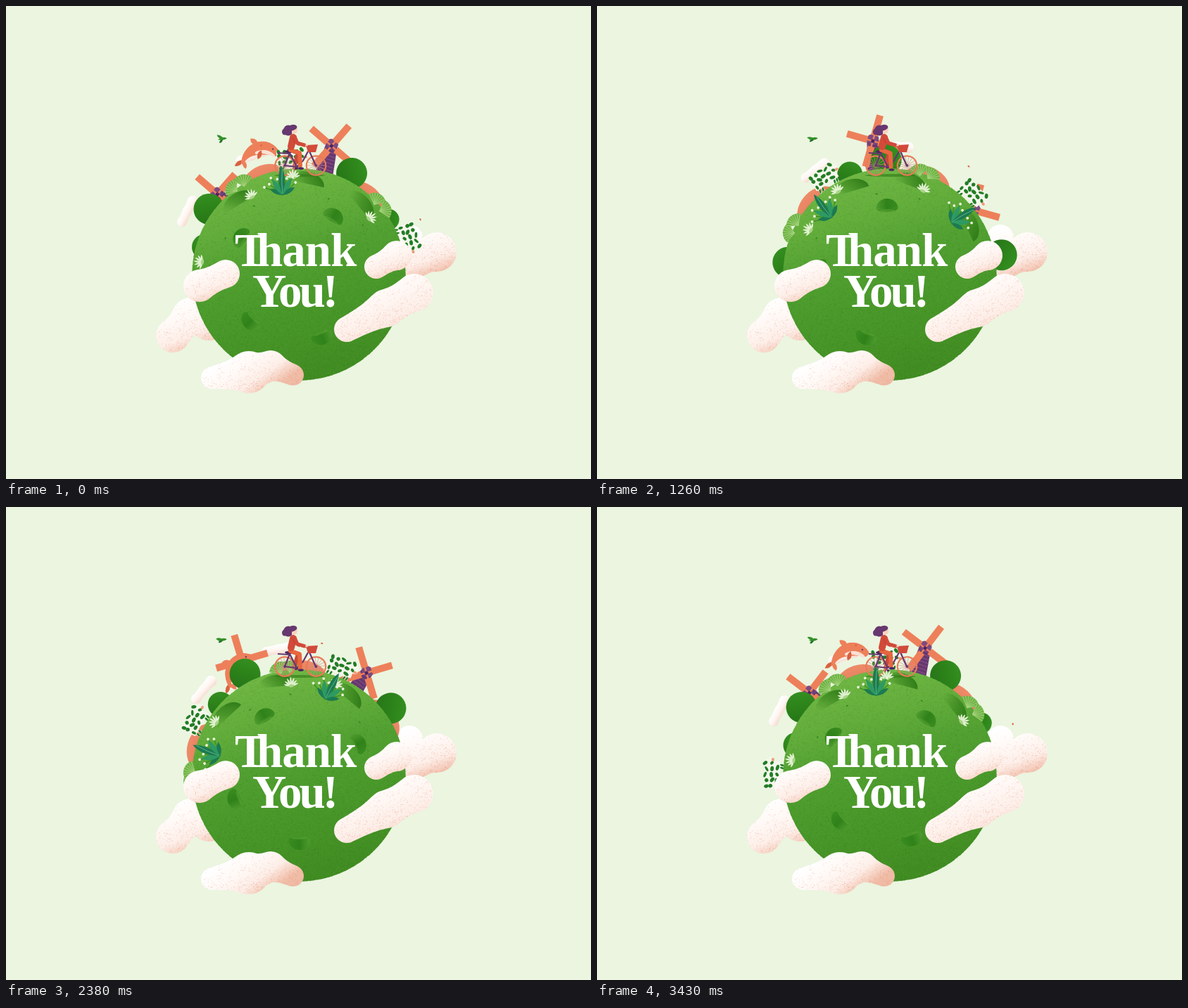
An HTML page with a canvas that plays this animation: 831 by 673 pixels, repeating every 3.5 s.

```html
<!DOCTYPE html>
<html lang="en">
<head>
<meta charset="utf-8">
<title>Thank You!</title>
<style>
html, body { margin: 0; width: 100%; height: 100%; overflow: hidden; background: #ebf5e0; }
canvas { display: block; }
</style>
</head>
<body>
<canvas id="stage" width="831" height="673"></canvas>
<script>
const W = 831, H = 673, LOOP = 3500, STEP = 70, TAU = Math.PI * 2;
const CX = 415, CY = 381;
const ORANGE = '#ed805a', PURPLE = '#67376f', PLUM = '#4d2460', RED = '#d24a3a', SKIN = '#f8d2bd';
const stage = document.getElementById('stage').getContext('2d');
let c = stage;

let seed = 7;
const rand = () => (seed = (seed * 16807) % 2147483647) / 2147483647;
const rad = d => d * Math.PI / 180;
const mix = (a, b, s) => a + (b - a) * s;

// Runs a drawing function once on its own sheet.
function sheet(draw) {
  const el = document.createElement('canvas');
  el.width = W;
  el.height = H;
  c = el.getContext('2d');
  draw();
  c = stage;
  return el;
}
function at(x, y, deg, draw) {
  c.save();
  c.translate(x, y);
  c.rotate(rad(deg));
  draw();
  c.restore();
}
function fade(x0, y0, x1, y1, ...stops) {
  const g = c.createLinearGradient(x0, y0, x1, y1);
  stops.forEach((s, i) => g.addColorStop(i / (stops.length - 1), s));
  return g;
}
function oval(x, y, rx, ry, fill, deg = 0, from = 0, to = 360) {
  c.fillStyle = fill;
  c.beginPath();
  c.ellipse(x, y, rx, ry, rad(deg), rad(from), rad(to));
  c.fill();
}
function trace(p) {
  c.beginPath();
  for (let i = 0; i < p.length; i += 2) c.lineTo(p[i], p[i + 1]);
}
function poly(fill, ...p) {
  c.fillStyle = fill;
  trace(p);
  c.fill();
}
function line(color, width, ...p) {
  c.strokeStyle = color;
  c.lineWidth = width;
  c.lineCap = c.lineJoin = width > 3 ? 'round' : 'butt';
  trace(p);
  c.stroke();
}
function leaf(x, y, deg, len, w, fill) {
  at(x, y, deg, () => {
    c.fillStyle = fill;
    c.beginPath();
    c.moveTo(0, 0);
    c.quadraticCurveTo(-w * 1.6, -len * .6, 0, -len);
    c.quadraticCurveTo(w * 1.4, -len * .5, 0, 0);
    c.fill();
  });
}

// Outline of circles (x, y, r) joined by soft necks.
function blob(p) {
  c.beginPath();
  for (let i = 0; i + 3 < p.length; i += 3) {
    for (let s = 0; s <= 1; s += 1 / 32) {
      const [x, y, r] = [0, 1, 2].map(j => mix(p[i + j], p[i + j + 3], s));
      const neck = r * (1 - .1 * Math.sin(Math.PI * s));
      c.moveTo(x + neck, y);
      c.arc(x, y, neck, 0, TAU);
    }
  }
}
function cloud(tint, ...p) {
  const edge = (j, sign) => Math.max(...p.filter((_, i) => i % 3 === j).map((v, i) => sign * v + p[i * 3 + 2])) * sign;
  const x0 = edge(0, -1), x1 = edge(0, 1), y0 = edge(1, -1), y1 = edge(1, 1);
  const w = x1 - x0, h = y1 - y0;
  c.save();
  blob(p);
  c.fillStyle = fade(x0 + w * .35, y0, x0 + w * .65, y1, '#fff', '#fff9f6', '#fdeee8', tint);
  c.fill();
  c.clip();
  c.fillStyle = 'rgba(228,145,115,.34)';
  for (let i = w * h * .25; i > 0; i--) {
    const u = rand(), v = rand();
    if (rand() < (u * .35 + v * .65) ** 2) c.fillRect(x0 + u * w, y0 + v * h, 1, 1);
  }
  c.restore();
}

const backClouds = sheet(() => {
  cloud('#f2bfa9', 237, 469, 24, 262, 441, 26, 288, 452, 24);
  cloud('#efb49d', 573, 330, 19, 582, 367, 20, 612, 350, 28);
});
const frontClouds = sheet(() => {
  cloud('#f4cbb9', 275, 398, 23, 312, 381, 20);
  cloud('#f0bca6', 293, 529, 16, 345, 521, 30, 376, 512, 22, 408, 525, 15);
  cloud('#f4cbb9', 526, 371, 17, 555, 355, 21);
  cloud('#f6d5c6', 484, 460, 18, 540, 430, 27, 580, 408, 27);
});
const globe = sheet(() => {
  c.beginPath();
  for (let a = 0; a < TAU; a += .006) {
    const r = 150.5 + .5 * rand();
    c.lineTo(416 + r * 1.006 * Math.cos(a), 382 + r * Math.sin(a));
  }
  c.fillStyle = fade(375, 235, 455, 530, '#70b745', '#64ae3c', '#52a032', '#4a992b', '#459226', '#408b22');
  c.fill();
  c.clip();
  for (let i = 0; i < 15000; i++) {
    c.fillStyle = rand() < .5 ? 'rgba(35,105,15,.17)' : 'rgba(140,200,95,.15)';
    c.fillRect(264 + rand() * 305, 232 + rand() * 300, 1, 1);
  }
});

function label() {
  c.fillStyle = '#fff';
  c.font = 'bold 67px "Liberation Serif", "Noto Serif", serif';
  c.letterSpacing = '-1px';
  c.fillText('T', 325, 370);
  c.fillText('hank', 356, 370);
  c.letterSpacing = '-4px';
  c.fillText('You!', 350, 428);
}

const bush = r => () => oval(0, 0, r, r, fade(-r, r, r, -r, '#23701a', '#2c8219', '#379423'));
const hill = () => oval(0, 24, 35, 26, fade(0, -2, 0, 30, '#ee8b68', '#e07a5c'));

function mill(t, lean) {
  poly(PURPLE, -8, -4, 8, -4, 13, 46, -13, 46);
  for (let y = 4; y < 44; y += 5) line('#8d5a90', .8, -9, y, 10, y + 1);
  oval(0, -3, 9, 7, '#7d4a80');
  for (let i = 0; i < 4; i++) {
    at(0, 0, 41 + 180 * t + i * 90 - lean, () => {
      line(ORANGE, 2.5, 0, 0, 10, 0);
      c.fillStyle = ORANGE;
      c.fillRect(8, -5, 30, 10);
    });
  }
  oval(0, 0, 2.5, 2.5, PLUM);
}

function puff() {
  blob([-17, 1, 7, 0, 0, 7, 16, 0, 8]);
  c.fillStyle = fade(0, -7, 0, 8, '#fff', '#fff6f2', '#f6d9cc');
  c.fill();
}

// The fish is bent along an arc and leaps once per loop.
function fish(t) {
  const s = ((t + .42) % 1) / .75;
  if (s > .98) return;
  const bend = 30, y = 202 + 93 * (s - .62) ** 2;
  at(314 + 82 * s, y, -58 + 88 * s, () => {
    c.translate(0, bend);
    const along = (a, draw) => at(0, 0, a, () => { c.translate(0, -bend); draw(); });
    along(-60, () => {
      leaf(2, 0, -55, 15, 4, '#d8613f');
      leaf(2, 0, -125, 13, 4, ORANGE);
    });
    along(-8, () => leaf(4, -5, -35, 14, 5, ORANGE));
    for (let a = -62; a <= 50; a += 2) {
      const r = 2 + 7.5 * Math.sin(Math.PI * ((a + 62) / 124) ** 1.2);
      along(a, () => oval(0, 0, 3, r, ORANGE));
    }
    for (let a = -12; a <= 48; a += 2) {
      along(a, () => oval(0, 5.5, 2, 2.6 * Math.cos(rad(a * 1.4 - 25)), '#fae0d3'));
    }
    along(5, () => leaf(0, 3, 205, 14, 4, '#d8613f'));
    along(36, () => oval(0, -2, 1.2, 1.2, PURPLE));
  });
}

const spots = Array.from({ length: 14 }, (_, i) => ({
  x: -16 + (i % 5) * 8 + rand() * 3, y: -11 + Math.floor(i / 5) * 8 + rand() * 3,
  rx: 2.6 + rand() * 1.6, ry: 1.6 + rand() * 1.2, deg: rand() * 180
}));
function cow() {
  const hide = '#f4f7eb';
  c.fillStyle = hide;
  c.fillRect(-19, -11, 38, 22);
  oval(20, -3, 5, 7, hide, -20);
  for (const x of [-15, -10, 10, 14]) {
    line(hide, 3.5, x, 8, x, 18);
    oval(x, 14, 1.4, 3, '#237d26', 15);
  }
  spots.forEach(s => oval(s.x, s.y, s.rx, s.ry, '#237d26', s.deg));
  oval(22, 1, 2.6, 2, '#ef9b7c');
}

function mound() {
  oval(0, 5, 26, 17, fade(-18, 10, 16, -10, 'rgba(68,145,38,0)', 'rgba(58,134,30,.6)', 'rgba(48,124,24,.95)'), 8, 180, 360);
}
function crater() {
  const fill = fade(-14, 0, 14, 0, '#4c992d', '#2f8119', '#388b1f');
  oval(0, 4, 15.5, 14, fill, 0, 180, 360);
  oval(0, 4, 15.5, 5, fill, 0, 0, 180);
  oval(0, 7, 11, 2, 'rgba(96,170,58,.5)');
}
function tuft() {
  for (let i = -3; i <= 3; i++) leaf(0, 5, i * 25, 13 - Math.abs(i) * .7, 1.8, '#e4f3d4');
  oval(0, 5, 4, 2, '#a9d488');
}
function fan() {
  for (const side of [-1, 1]) {
    at(side * 6, 9, side * 23, () => {
      c.fillStyle = '#6db344';
      c.beginPath();
      c.moveTo(0, 0);
      c.arc(0, 0, 17, rad(-145), rad(-35));
      c.fill();
      for (let k = -50; k <= 50; k += 14) at(0, 0, k, () => line('#a5d27c', .9, 0, 0, 0, -17));
    });
  }
}
function plant() {
  for (let a = -56; a <= 56; a += 16) {
    at(0, 0, a, () => {
      const len = 27 + 3 * Math.sin(a);
      line('#39901f', 1.3, 0, 0, 0, -len);
      oval(0, -len, 1.9, 1.9, '#eaf6dc');
    });
  }
  for (let i = -2; i <= 2; i++) {
    leaf(0, 0, 8 + i * 30, 42 / (1 + Math.abs(i) * .55), 6 - Math.abs(i), i % 2 ? '#2e9a62' : '#1c7a52');
  }
  line('#6bc091', .8, 0, -2, 2, -18, 6, -36);
}
const speck = color => () => oval(0, 0, 1.6, 1.1, color);

// Angle from the top, in degrees, after u turns of the loop.
const turn = (a, b, q = 0) => u => a - b * u - q * u * u;
const sink = r => d => r + Math.min(0, (d + 40) * .4);
const rise = d => Math.max(150, 191 - d * d * .0145);

// Draws every copy of a part that rides around the globe.
function ring(t, angle, dist, draw, lo, hi) {
  for (let u = t - 1; u < 4; u++) {
    const d = angle(u);
    if (d < lo || d > hi) continue;
    const r = typeof dist === 'function' ? dist(d) : dist;
    at(CX, CY, d, () => {
      c.translate(0, -r);
      draw(d);
    });
  }
}

function wheel(x, t) {
  at(x, 227, t * 720, () => {
    for (let a = 0; a < 180; a += 22.5) at(0, 0, a, () => line('#cf8f86', .6, -13, 0, 13, 0));
    c.strokeStyle = '#ea7a57';
    c.lineWidth = 2.2;
    c.beginPath();
    c.arc(0, 0, 13.7, 0, TAU);
    c.stroke();
    oval(0, 0, 1.8, 1.8, PURPLE);
  });
}
function leg(a, fill) {
  const dx = Math.cos(a), dy = Math.sin(a), x = 414 + 4 * dx, y = 227 + 4 * dy;
  line(fill, 6, 404, 205, 416 + dx, 209 + dy, x, y);
  oval(x + 1, y + 4, 4, 1.8, PLUM);
}
function rider(t) {
  const a = t * TAU * 3;
  oval(417, 241, 36, 2, 'rgba(48,120,24,.6)');
  leg(a + Math.PI, '#c94a38');
  wheel(396, t);
  wheel(440.5, t);
  line(PURPLE, 2.2, 396, 227, 403, 209, 413, 229, 396, 227);
  line(PURPLE, 2.2, 413, 229, 422, 220, 429, 207);
  line(PURPLE, 2.2, 422, 196, 428, 200, 440, 227);
  line(PURPLE, 2, 386, 209, 402, 210);
  oval(402, 207, 6, 2, PLUM);
  poly(RED, 426, 198, 443, 197, 440, 208, 429, 208);
  leg(a, '#e8663f');
  oval(401, 177, 7, 7.5, PURPLE);
  oval(396, 179, 4, 4.5, PURPLE);
  line(SKIN, 4, 408, 178, 408, 184);
  oval(410.5, 176, 3.6, 5.2, SKIN);
  oval(407, 173, 6.5, 4, PURPLE, -12);
  line(RED, 10, 408, 187, 405, 200);
  line(RED, 5, 410, 186, 414, 195, 424, 198);
  line('#b43b34', .8, 407, 188, 411, 196, 417, 199);
  oval(427, 198, 1.8, 1.6, SKIN);
}

function bird(t) {
  const flap = 18 * Math.sin(t * TAU * 5 + 1);
  leaf(301, 190, 82, 13, 2.6, '#35912a');
  leaf(309, 189, -75 + flap, 11, 2.5, '#35912a');
  leaf(308, 190, -118 - flap, 7, 2, '#1f6f22');
}

function render(t) {
  c.fillStyle = '#ebf5e0';
  c.fillRect(0, 0, W, H);
  c.drawImage(backClouds, 0, 0);
  bird(t);
  ring(t, turn(-21.5, 39), 181, puff, -70, 10);
  ring(t, turn(14.6, 60), rise, d => mill(t, d), -56, 62);
  ring(t, turn(42, 50.6, 10.9), 161, hill, -80, 66);
  fish(t);
  ring(t, turn(59, 82), 150, bush(15), 36, 64);
  ring(t, turn(8, 82), sink(152), bush(18), -95, -5);
  ring(t, turn(28, 82), sink(162), bush(22), -95, 98);
  ring(t, turn(71.5, 69.25, 6.25), 166, cow, -91.5, 71.6);
  ring(t, turn(66, 82), 190, speck('#d9663f'), -40, 68);
  c.drawImage(globe, 0, 0);
  for (const a of [5, 42]) ring(t, turn(a, 82), 134, mound, -66, 62);
  ring(t, turn(31.6, 94.9, -5.8), 97, crater, -225, 86);
  for (const a of [-33, 22]) ring(t, turn(a, 86), 115, speck('#378a20'), -70, 70);
  ring(t, turn(50, 84), 155, fan, -94, 75);
  rider(t);
  ring(t, turn(52, 83), 132, tuft, -80, 66);
  ring(t, turn(-3, 80), 142, tuft, -88, 40);
  ring(t, turn(-11, 96), 114, plant, -94, 74);
  label();
  c.drawImage(frontClouds, 0, 0);
}

function tick(now) {
  render(Math.floor(now % LOOP / STEP) * STEP / LOOP);
  requestAnimationFrame(tick);
}
requestAnimationFrame(tick);
</script>
</body>
</html>
```
